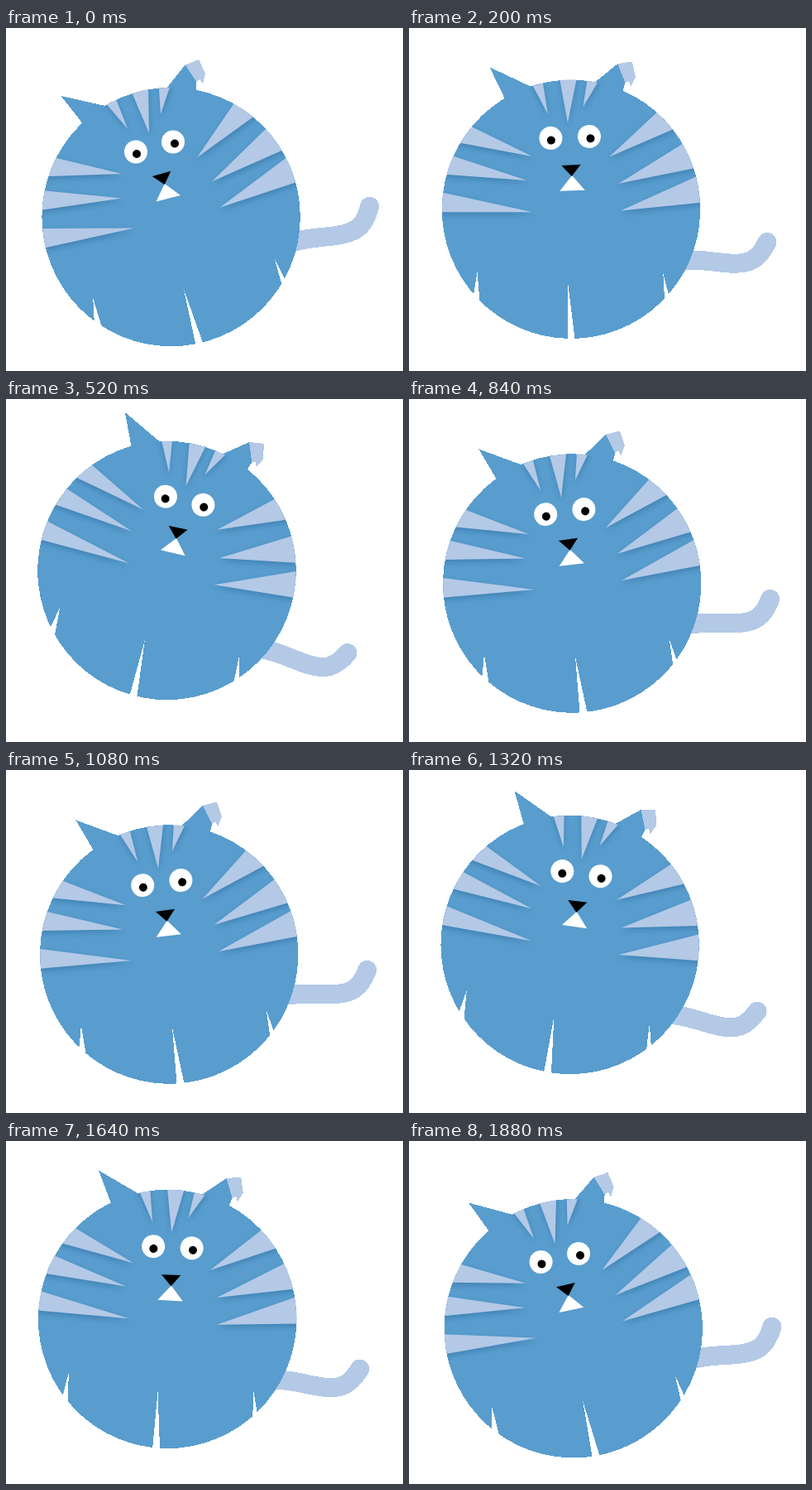
These frames come from a looping animation (480x414 px, 1920 ms). An HTML page:

```html
<!DOCTYPE html>
<html lang="en">
<head>
<meta charset="utf-8">
<title>Rocking cat</title>
<style>
  html, body { margin: 0; width: 100%; height: 100%; overflow: hidden; background: #fff; }
  svg { display: block; width: 100vw; height: 100vh; }
  .body { fill: #589dce; }
  .light { fill: #b3c9e6; }
  .white { fill: #fff; }
  .crisp { shape-rendering: crispEdges; }
  .tail { fill: none; stroke: #b3c9e6; stroke-width: 23; stroke-linecap: round; }
  .shadow { fill: #1f5488; opacity: .36; }
</style>
</head>
<body>
<svg viewBox="0 0 480 414">
  <defs>
    <clipPath id="belly"><circle cx="199.6" cy="228" r="156.2"/></clipPath>
    <filter id="soft" filterUnits="userSpaceOnUse" x="0" y="0" width="480" height="414">
      <feGaussianBlur stdDeviation="3"/>
    </filter>
    <g id="stripes">
      <!-- forehead -->
      <path d="M119 89L147.3 122L131.5 82z"/>
      <path d="M150.5 74L173 127L172 68z"/>
      <path d="M184.5 68L187 104L199.5 67z"/>
      <!-- right cheek -->
      <path d="M278.5 87L231 156.3L305 103z"/>
      <path d="M319 117L249 185.3L340 145z"/>
      <path d="M345 152L258.5 216.7L356 184.5z"/>
      <!-- left cheek -->
      <path d="M57 156L140 176L46 179.2z"/>
      <path d="M39 195.5L140 205.5L38 220.5z"/>
      <path d="M38 242L155 241.5L42 266.5z"/>
    </g>
  </defs>
  <g id="cat">
    <g class="crisp">
      <path class="tail" d="M340 261C362 252 385 253.500 405 249.500S434 238 439.500 215.500"/>
      <path class="body" d="M66.500 82L120 94L130 130L92 114.500z"/>
      <path class="body" d="M193 74L216.500 44.500L230.500 65L229.500 77L205 90z"/>
      <path class="light" d="M216.500 44.500L233 38L241 55L238 67.500L234.200 62L230.500 65z"/>
      <circle class="body" cx="199.6" cy="228" r="156.2"/>
    </g>
    <g clip-path="url(#belly)">
      <g class="shadow" filter="url(#soft)"><use href="#stripes" x="1" y="3"/></g>
      <use class="light" href="#stripes"/>
    </g>
    <g class="white crisp">
      <path d="M105.300 326.500L107.200 364L118 368z"/>
      <path d="M215 315.500L231 390L241.200 389z"/>
      <path d="M325 279.500L335.500 317L341 311z"/>
    </g>
    <circle class="white" cx="157" cy="149.500" r="14"/>
    <circle cx="158" cy="152" r="5"/>
    <circle class="white" cx="202" cy="137.500" r="14"/>
    <circle cx="204" cy="139.500" r="5"/>
    <path class="white" d="M191.800 188L211 202L181.500 209.500z"/>
    <path d="M176.700 179L199.200 172.800L191.800 189z"/>
  </g>
</svg>
<script>
  const cat = document.getElementById('cat');
  const STEP = 40, SWING = 480, TILT = 30;

  // Tilts at constant speed to the right and back, in steps of 40 ms.
  function draw(ms) {
    const time = Math.floor(ms / STEP) * STEP % (2 * SWING);
    const angle = TILT * (1 - Math.abs(time / SWING - 1));
    cat.setAttribute('transform', `rotate(${angle} 240 207)`);
  }

  let start;
  function tick(now) {
    start ??= now;
    draw(now - start);
    requestAnimationFrame(tick);
  }
  draw(0);
  requestAnimationFrame(tick);
</script>
</body>
</html>
```
